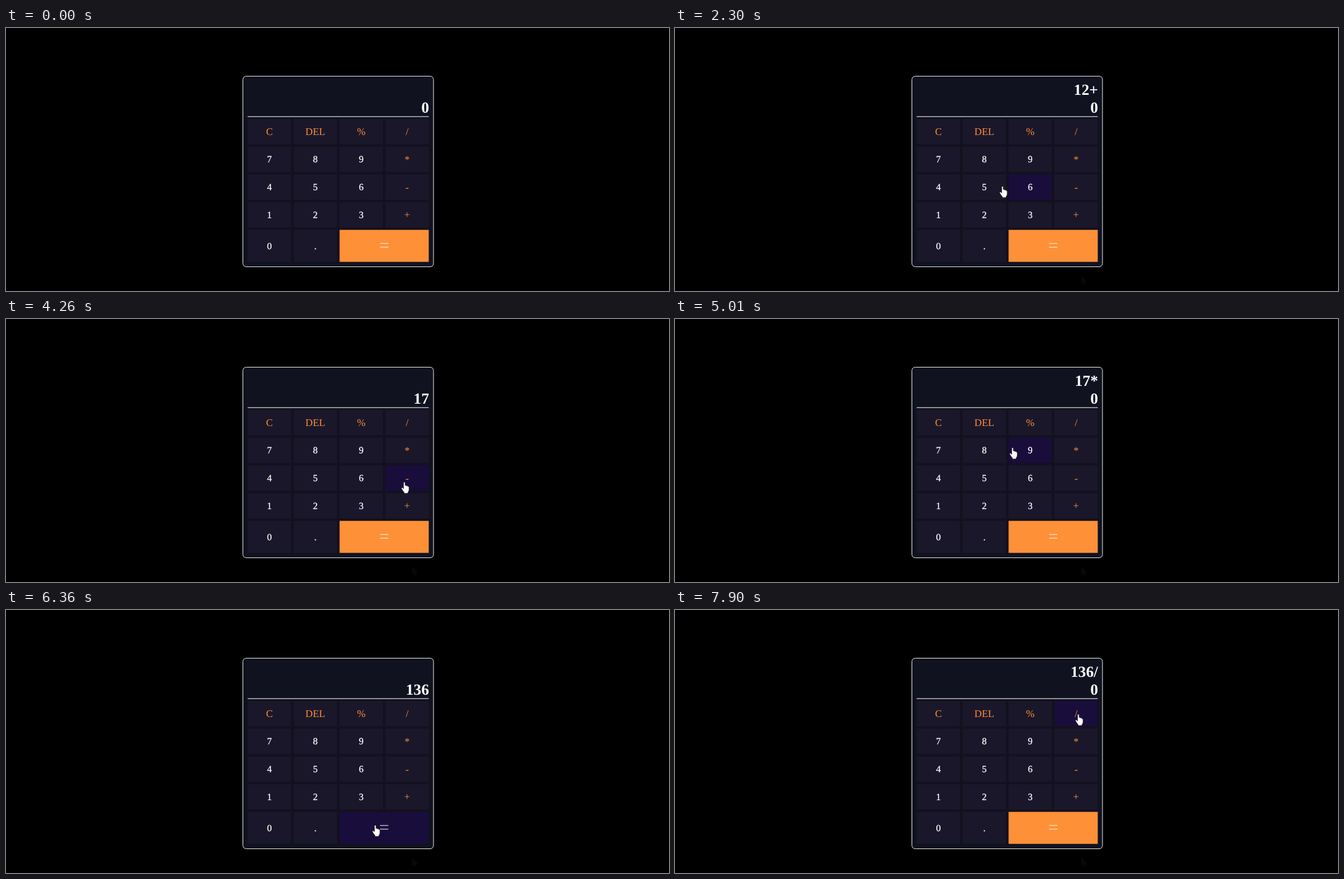
Animation of 1188x472 px, one loop 8000 ms. Source, as an HTML page:

```html
<!DOCTYPE html>
<html lang="en">
<head>
<meta charset="utf-8">
<title>Calculator</title>
<style>
  html, body { margin: 0; width: 100%; height: 100%; overflow: hidden; background: #000; }
  svg { display: block; width: 100%; height: 100%; }
  text { font-family: "Liberation Serif", "Times New Roman", serif; text-rendering: geometricPrecision; }
  .screen { font-size: 27.7px; font-weight: bold; fill: #fff; text-anchor: end; }
  .key rect { fill: currentColor; }
  .key text { text-anchor: middle; stroke-width: .3; }
  .digit { font-size: 17px; fill: #fff; stroke: #fff; }
  .operator { font-size: 18.2px; fill: #fe9038; }
  .key .equal { font-size: 33px; fill: #fff; stroke: currentColor; stroke-width: .6; }
</style>
</head>
<body>
<svg viewBox="0 0 1188 472">
  <rect width="1188" height="472" fill="#000"/>
  <path id="trace" fill="#08080e" d="M728 444v16l3.700-3.500 2.500 5 2-1-2.400-4.800h5z"/>
  <rect x="424.500" y="86.500" width="341.500" height="342" rx="6" fill="#10131f" stroke="#fff"/>
  <rect x="433" y="160" width="324.500" height="260" fill="#13111f"/>
  <rect x="433" y="158.500" width="324.500" height="1.100" fill="#fff"/>
  <text id="upper" class="screen" x="758" y="120.300"></text>
  <text id="lower" class="screen" x="758" y="152"></text>
  <g id="keys"></g>
  <g id="cursor">
    <path id="arrow" fill="#fff" stroke="#000" stroke-width=".8"
      d="M0 0v16l3.700-3.500 2.500 5 2-1-2.400-4.800h5z"/>
    <path id="hand" fill="#fff" stroke="#11101c" stroke-width=".9" stroke-linejoin="round"
      d="M-1.500 12V1.500Q-1.500 0 0 0T1.500 1.500V6Q3 5 4 6.800Q5.800 6 6.400 7.800Q8.500 7.300 8.500 9.500V14
         Q8.500 17 6.500 18.500V20.500H-.5V18.500Q-3 16-5 12Q-5.500 10.500-4.300 10Q-3 9.700-1.500 12Z"/>
  </g>
</svg>
<script>
const NS = 'http://www.w3.org/2000/svg';
const LOOP = 8000;
const HOVER_LAG = 70;
const LEFT = 433, TOP = 163, PITCH_X = 82.2, PITCH_Y = 49.75, GAP = 4;
const KEY_FILL = '#1b172a', HOVER_FILL = '#190d3b', ORANGE = '#fe9038';
const BASELINE = { digit: 5.7, operator: 6.2, equal: 10 };
const $ = id => document.getElementById(id);

function add(tag, attrs, parent) {
  const el = document.createElementNS(NS, tag);
  for (const name in attrs) el.setAttribute(name, attrs[name]);
  return parent.appendChild(el);
}

function makeKey(label, col, row) {
  const kind = label === '=' ? 'equal' : /[\d.]/.test(label) ? 'digit' : 'operator';
  const x = LEFT + col * PITCH_X, y = TOP + row * PITCH_Y;
  const w = PITCH_X * (kind === 'equal' ? 2 : 1) - GAP, h = row === 4 ? 58 : 46;
  const cx = x + w / 2, cy = y + h / 2;
  const group = add('g', { class: 'key' }, $('keys'));
  add('rect', { x: x + .3, y: y + .3, width: w - .6, height: h - .6 }, group);
  add('text', { class: kind, x: cx, y: cy + BASELINE[kind] }, group).textContent = label;
  return { label, group, cx, cy, w, h, fill: kind === 'equal' ? ORANGE : KEY_FILL };
}

const keys = ['C DEL % /', '7 8 9 *', '4 5 6 -', '1 2 3 +', '0 . =']
  .flatMap((line, row) => line.split(' ').map((label, col) => makeKey(label, col, row)));

// The pointer reaches a key, may press it, then leaves; dx and dy shift its aim
function stop(label, at, { press, leave = press ?? at, dx = 0, dy = 0 } = {}) {
  const key = keys.find(k => k.label === label);
  return { label, at, press, leave, x: key.cx + dx, y: key.cy - 5 + dy };
}

const stops = [
  { at: 450, leave: 450, x: 728, y: 444 },
  stop('1', 1060, { press: 1130 }),
  stop('2', 1400, { press: 1480 }),
  stop('+', 1750, { press: 1890 }),
  stop('5', 2465, { press: 2570, dy: -8 }),
  stop('=', 3320, { press: 3390, leave: 3860, dx: -35 }),
  stop('-', 4260, { dx: -5, dy: 12 }),
  stop('*', 4600, { press: 4670 }),
  stop('8', 5210, { press: 5480 }),
  stop('=', 5845, { press: 6160, leave: 6760, dx: -16 }),
  stop('8', 7030),
  stop('/', 7560, { press: 7770, leave: LOOP, dx: 4, dy: 6 })
];

const operations = {
  '+': (a, b) => a + b, '-': (a, b) => a - b,
  '*': (a, b) => a * b, '/': (a, b) => a / b
};

function press({ upper, lower }, label) {
  if (label in operations) return { upper: lower + label, lower: '0' };
  if (label === '=') {
    const result = operations[upper.slice(-1)](parseFloat(upper), +lower);
    return { upper: '', lower: String(result) };
  }
  return { upper, lower: lower === '0' ? label : lower + label };
}

const ease = k => k * k * (3 - 2 * k);

function pointerAt(t) {
  if (t < stops[0].at) return null;
  const i = stops.findLastIndex(s => s.at <= t);
  const from = stops[i], to = stops[i + 1];
  if (!to || t <= from.leave) return from;
  const k = ease((t - from.leave) / (to.at - from.leave));
  return { x: from.x + (to.x - from.x) * k, y: from.y + (to.y - from.y) * k };
}

const isOver = (key, p) => p &&
  Math.abs(p.x - key.cx) <= key.w / 2 && Math.abs(p.y - key.cy) <= key.h / 2;

function show(id, visible) {
  $(id).setAttribute('visibility', visible ? 'visible' : 'hidden');
}

function draw(t) {
  const screen = stops.filter(s => s.press <= t)
    .reduce((state, s) => press(state, s.label), { upper: '', lower: '0' });
  $('upper').textContent = screen.upper;
  $('lower').textContent = screen.lower;

  const hovered = pointerAt(t - HOVER_LAG);
  for (const key of keys)
    key.group.setAttribute('color', isOver(key, hovered) ? HOVER_FILL : key.fill);

  const tip = pointerAt(t);
  const onKeys = tip && tip.y < 420;
  show('trace', tip);
  show('hand', onKeys);
  show('arrow', tip && !onKeys);
  if (tip) $('cursor').setAttribute('transform', `translate(${tip.x} ${tip.y})`);
}

const start = performance.now();
function tick() {
  draw((performance.now() - start) % LOOP);
  requestAnimationFrame(tick);
}
tick();
</script>
</body>
</html>
```
